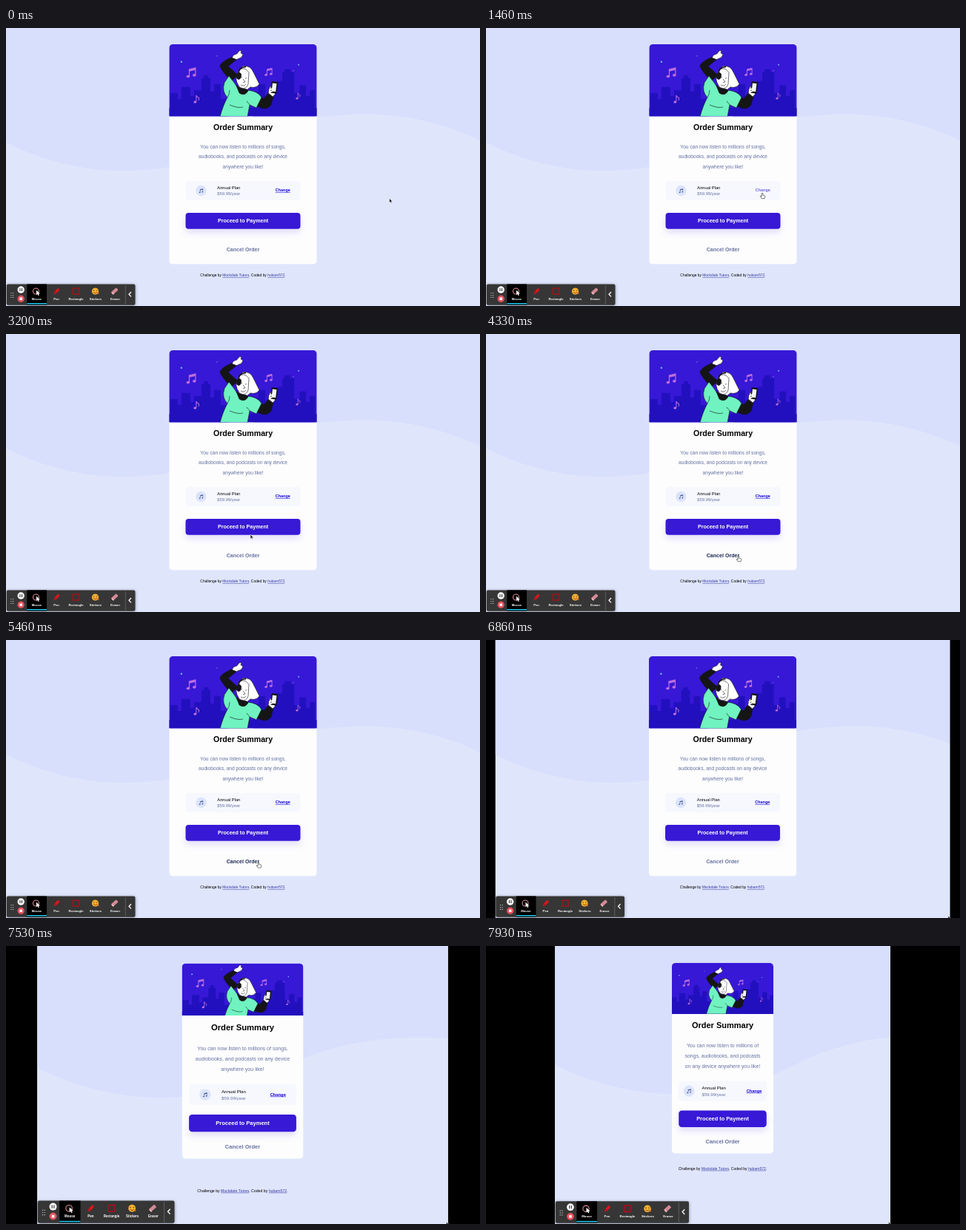
These frames come from a looping animation (640 px wide and 376 px high, 8000 ms). An HTML page:

```html
<!DOCTYPE html>
<html lang="en">
<head>
<meta charset="utf-8">
<title>Order Summary</title>
<style>
  html, body { margin: 0; width: 100%; height: 100%; overflow: hidden; background: #000; }
  #stage { display: block; width: 100vw; height: 100vh; font-family: "Liberation Sans", Arial, sans-serif; }
  .center { text-anchor: middle; }
  .bold { font-weight: bold; }
  .muted { fill: #6672a0; }
  .link { fill: #3436a0; text-decoration: underline; }
  #change { fill: #1500d8; text-decoration: underline; }
  #change.hover { fill: #7063e0; text-decoration: none; }
  #button { fill: #3719d6; filter: drop-shadow(0 5px 4px #3719d622); }
  #button.hover { fill: #766cf1; }
  #cancel.hover { fill: #1d2a54; }
</style>
</head>
<body>
<svg id="stage" viewBox="0 0 640 376" preserveAspectRatio="none">
  <defs>
    <clipPath id="cardClip"><rect id="cardShape" y="22" rx="5"/></clipPath>
    <g id="pair">
      <path d="M-3.4 4.2V-4.8L5 -6.8V2.6" fill="none" stroke="currentColor" stroke-width="1.2"/>
      <path d="M-3.4 -4.8L5 -6.8V-4L-3.4 -2Z" fill="currentColor"/>
      <ellipse cx="-5" cy="4.6" rx="2.3" ry="1.8" fill="currentColor"/>
      <ellipse cx="3.4" cy="3" rx="2.3" ry="1.8" fill="currentColor"/>
    </g>
    <g id="single">
      <path d="M0 4V-5Q1 -2 3.6 -1.4Q4 1 3 2" fill="none" stroke="currentColor"/>
      <ellipse cx="-1.6" cy="4.2" rx="2" ry="1.6" fill="currentColor"/>
    </g>
    <path id="pointer" d="M0 0V5.6L1.3 4.4L2.2 6.4L3.2 6L2.3 4.1H4.1Z" fill="#111" stroke="#fff" stroke-width=".5"/>
  </defs>

  <g id="page">
    <rect width="680" height="400" fill="#dfe6fc"/>
    <path d="M0 0H680V172Q660 161 640 152C600 132 545 116.5 487 116.5C440 116.5 390 122 338 143C290 165 250 193 155 193C105 193 50 180 0 155Z" fill="#d7dffc"/>

    <g id="middle">
      <g clip-path="url(#cardClip)">
        <rect id="card" y="22" fill="#fdfdfe"/>
        <svg id="art" y="22" viewBox="220.5 22 199 97.5" preserveAspectRatio="xMidYMid slice">
          <rect x="220" y="21" width="200" height="100" fill="#3718d7"/>
          <g fill="#2210be">
            <path d="M222 120V88H232V96H237V80H249V92H254V84H264V68H267V64H273V68H276V86H281V76H290V96H300V120Z"/>
            <path d="M334 120V86H341V76H350V92H358V82H366V72H373V60H376V56H384V60H389V88H396V78H405V92H410V84H417V120Z"/>
            <path d="M220 108H420V120H220Z"/>
          </g>
          <g color="#bd6fdc">
            <use href="#pair" x="251" y="61"/>
            <use href="#pair" transform="translate(355 60) scale(.8)"/>
            <use href="#single" x="257" y="96"/>
            <use href="#single" transform="translate(394 92) scale(.8)"/>
          </g>
          <g fill="#6cb8ea">
            <circle cx="237" cy="46" r="1.2"/><circle cx="395" cy="50" r="1"/>
            <circle cx="285" cy="38" r=".8" fill="#a06be0"/><circle cx="388" cy="58" r=".7" fill="#a06be0"/>
          </g>
          <g stroke="#111" stroke-width=".6" stroke-linejoin="round">
            <path d="M305 41L307 37L312 35L315 31L318 31L317 34L320 36L318 40L311 43Z" fill="#fff"/>
            <path d="M304 40L311 43L300 52L313 64L304 72Q291 58 289 52Q289 47 304 40Z" fill="#151515"/>
            <path d="M319 52Q330 50 334 60Q338 68 342 76Q338 82 330 80L325 84L314 80Z" fill="#fff"/>
            <path d="M314 58Q321 51 328 60L327 76Q324 84 317 81Q310 75 311 66Z" fill="#fff"/>
            <path d="M320 69L323 73L320 74M317 77Q321 80 324 76M316 67H319M323 68H325" fill="none"/>
            <path d="M341 91L348 96L354 88L361 91L358 104Q352 111 345 108L335 104Z" fill="#151515"/>
            <path d="M301 65L308 74L314 83Q321 88 325 84Q340 85 345 94L338 108L329 104L326 120H289Q293 105 299 94Q291 86 295 74Z" fill="#70f2c1"/>
            <path d="M311 78L317 82L325 83L327 85Q322 93 315 88Z" fill="#151515"/>
            <path d="M299 94Q302 90 302 84M329 104L325 99M302 104Q313 109 320 107" fill="none"/>
            <path d="M354 88L356 80L361 78L365 82L363 90L360 93Z" fill="#fff"/>
            <rect x="358" y="73" width="8" height="15" rx="1.2" fill="#151515" transform="rotate(7 362 80)"/>
            <rect x="359.2" y="75" width="5.6" height="11" fill="#f4f4ff" stroke="none" transform="rotate(7 362 80)"/>
            <path d="M355 84L360 82M355 87L360 85" stroke="#fff" stroke-width="1.8"/>
            <path d="M314 64Q314 52 324 53" fill="none" stroke-width="1.6"/>
            <ellipse cx="314.5" cy="65" rx="3" ry="4.6" fill="#151515" transform="rotate(12 314 65)"/>
          </g>
        </svg>
      </g>

      <g id="intro" class="center">
        <text class="bold" y="138" font-size="10.6">Order Summary</text>
        <g id="blurb" class="muted" font-size="6.65">
          <text y="163"></text><text y="176.3"></text><text y="189.6"></text>
        </g>
      </g>

      <g id="plan">
        <rect id="planBox" y="207" height="26" rx="4" fill="#f6f8fe"/>
        <g id="planIcon" color="#47568f">
          <circle r="7.2" fill="#dbe4fb"/>
          <use href="#pair" transform="translate(.3 .4) scale(.42)"/>
        </g>
        <g id="planText">
          <text y="217.9" font-size="5.75">Annual Plan</text>
          <text class="muted" y="226.2" font-size="5.85">$59.99/year</text>
        </g>
        <text id="change" class="bold" y="221.4" font-size="5.45" text-anchor="end">Change</text>
      </g>

      <g id="pay" class="center bold" font-size="7.1">
        <rect id="button" y="250" height="21.8" rx="4"/>
        <text y="263.2" fill="#fff">Proceed to Payment</text>
      </g>
      <text id="cancel" class="center bold muted" font-size="7.1">Cancel Order</text>
      <text id="footer" class="center" font-size="4.9">Challenge by <tspan class="link">Mockdale Tutors</tspan>. Coded by <tspan class="link">hubam572</tspan>.</text>
    </g>

    <g id="toolbar" class="center bold" font-size="4.2" fill="#fff">
      <rect x=".8" y="346.4" width="173.7" height="28.4" rx="2" fill="#363636" style="filter:drop-shadow(0 1px 2px #0006)"/>
      <path d="M7 358V365M9.6 358V365" stroke="#ccc" stroke-width="1.1" stroke-dasharray="1.1 1.8"/>
      <circle cx="20.2" cy="354" r="4.7"/>
      <path d="M19 352V356M21.5 352V356" stroke="#333" stroke-width="1.1"/>
      <circle cx="20.2" cy="366.2" r="4.7" fill="#e8505b"/>
      <path d="M18.5 364.5H22V368H18.5Z"/>
      <path d="M28.3 346.4H55V374.8H28.3Z" fill="#000"/>
      <path d="M28.3 372H55V373.7H28.3Z" fill="#19b5d8"/>
      <circle cx="40.5" cy="356" r="4" fill="none" stroke="#d98a90" stroke-width="1.1"/>
      <path d="M41 354.5V361L42.5 359.8L43.6 362L44.8 361.4L43.8 359.4H46Z"/>
      <path d="M64.5 360L65.5 356.5L70 351.5L72.5 354L68 359Z" fill="#d8171f"/>
      <path d="M65.5 356.5L68 359" stroke="#7d0d12" stroke-width=".8"/>
      <rect x="90.3" y="352" width="8.4" height="8" fill="none" stroke="#b50d15" stroke-width="1.2"/>
      <circle cx="120.5" cy="356" r="4.6" fill="#f6b52c"/>
      <path d="M117.5 355H119.5M121.5 355H123.5M118.2 357.5Q120.5 360 122.8 357.5" fill="none" stroke="#7c3c10" stroke-width=".9"/>
      <path d="M122 359L125 357L125.5 360Z" fill="#e46f24"/>
      <rect x="142" y="353.7" width="9.5" height="4.4" rx="1" fill="#d38a95" transform="rotate(-42 146.7 356)"/>
      <path d="M143 358L145.5 360.3" stroke="#f2cdd2" stroke-width="1.3"/>
      <text x="41.5" y="367.6">Mouse</text><text x="68" y="367.6">Pen</text><text x="94.5" y="367.6">Rectangle</text>
      <text x="121" y="367.6">Stickers</text><text x="147.5" y="367.6">Eraser</text>
      <path d="M161.3 348V374" stroke="#777" stroke-width=".6"/>
      <path d="M169 357L166 360.2L169 363.4" fill="none" stroke="#fff" stroke-width="1.3"/>
    </g>
  </g>

  <rect id="leftBar" height="376"/>
  <rect id="rightBar" height="376" width="320"/>
  <use id="arrow" href="#pointer"/>
  <path id="hand" d="M-.8 .6Q0 -.6 .8 .6V3L3.4 3.7Q4 4 3.7 5.6L3 7.6H-.8L-2.8 4.6Q-2.4 3.6 -.8 5Z" fill="#fff" stroke="#222" stroke-width=".6"/>
</svg>

<script>
const LOOP = 8000, FRAME = 200 / 3, BREAKPOINT = 533;
const el = Object.fromEntries([...document.querySelectorAll("[id]")].map(node => [node.id, node]));
const blurbLines = [...el.blurb.children];
const WIDE_TEXT = ["You can now listen to millions of songs,", "audiobooks, and podcasts on any device", "anywhere you like!"];
const NARROW_TEXT = ["You can now listen to millions of", "songs, audiobooks, and podcasts", "on any device anywhere you like!"];

// time, x, y
const pointerKeys = [
  [0, 517.7, 230.6], [120, 517.7, 230.6], [800, 373, 223], [1750, 373, 223], [2250, 330, 261], [2950, 330, 262],
  [3200, 330, 271.3], [3850, 341, 300], [5500, 341, 300.5], [6060, 626, 371], [6400, 636.5, 373]
];
// time, left margin of the window, zoom
const windowKeys = [[6400, 0, 1], [6866, 12.3, 1], [6933, 29, 1.012], [7533, 42, 1.063], [7800, 76, 1.045], [7933, 93, 1.037]];

const linear = p => p, smooth = p => p * p * (3 - 2 * p);

function sample(keys, t, ease) {
  const next = keys.findIndex(key => key[0] > t);
  if (next === 0) return keys[0].slice(1);
  if (next < 0) return keys.at(-1).slice(1);
  const a = keys[next - 1], b = keys[next];
  const p = ease((t - a[0]) / (b[0] - a[0]));
  return a.slice(1).map((value, i) => value + (b[i + 1] - value) * p);
}

function set(node, attributes) {
  for (const name in attributes) node.setAttribute(name, attributes[name]);
}
const move = (node, x, y) => set(node, { transform: `translate(${x} ${y})` });

function layout(left, zoom) {
  const right = left ? 639 - left : 640;
  const width = (right - left) / zoom;
  const small = width < BREAKPOINT;
  const card = small ? 154.5 + .2577 * (width - 523) : 199.4;
  const inner = card - (small ? 18 : 44.4);
  const margin = small ? 6.3 + .32 * (card - 132.6) : 13.7;
  const height = small ? 248.7 : 297.5;
  const shift = small ? -30.8 : 0;

  set(el.page, { transform: `translate(${left} 0) scale(${zoom})` });
  move(el.middle, width / 2, 0);
  for (const node of [el.cardShape, el.card]) set(node, { x: -card / 2, width: card, height });
  set(el.art, { x: -card / 2, width: card, height: 97.2 + shift });
  move(el.intro, 0, shift);
  const lines = inner < 119.5 ? NARROW_TEXT : WIDE_TEXT;
  blurbLines.forEach((line, i) => line.textContent = lines[i]);

  move(el.plan, -inner / 2, shift);
  set(el.planBox, { width: inner });
  move(el.planIcon, margin + 7.2, 220);
  move(el.planText, small ? 30.4 + .5 * (card - 132.6) : 42.8, 0);
  set(el.change, { x: inner - margin });

  move(el.pay, 0, small ? -35.5 : 0);
  set(el.button, { x: -inner / 2, width: inner });
  set(el.cancel, { y: small ? 257.8 : 302 });
  set(el.footer, { y: small ? 313.2 + .247 * (width - 523) : 336.4 });
  move(el.toolbar, 0, 376 / zoom - 376);
  set(el.leftBar, { width: left });
  set(el.rightBar, { x: right });
}

function point(x, y) {
  const over = (node, x0, y0, x1, y1) => {
    const inside = x > x0 && x < x1 && y > y0 && y < y1;
    node.classList.toggle("hover", inside);
    return inside;
  };
  const hovered = [
    over(el.change, 363, 213, 384, 226),
    over(el.button, 242, 250, 397, 271.2),
    over(el.cancel, 297, 293, 343, 306)
  ].some(Boolean);
  move(el.arrow, x, y);
  move(el.hand, x, y);
  set(el.arrow, { visibility: hovered ? "hidden" : "visible" });
  set(el.hand, { visibility: hovered ? "visible" : "hidden" });
}

function draw() {
  const t = Math.floor((performance.now() % LOOP + 7) / FRAME) * FRAME;
  const [left, zoom] = sample(windowKeys, t, linear);
  const [x, y] = sample(pointerKeys, t, smooth);
  layout(left, zoom);
  point(x - left, y);
  requestAnimationFrame(draw);
}
draw();
</script>
</body>
</html>
```
